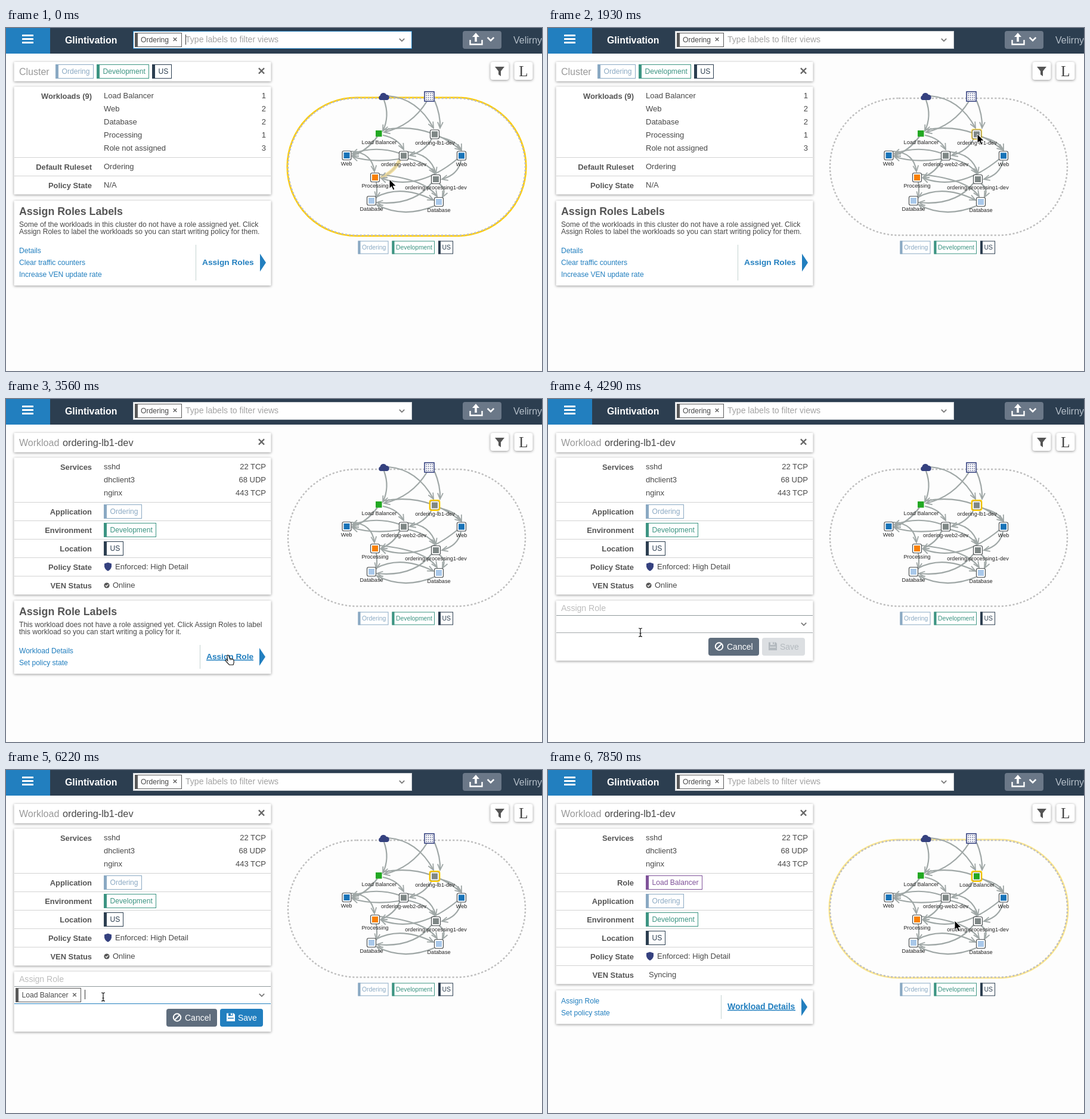
These frames come from a looping animation (899 by 576 pixels, 7.99 s). An HTML page:

```html
<!DOCTYPE html>
<html lang="en">
<head>
<meta charset="utf-8">
<title>Workload map</title>
<style>
  html, body { margin: 0; width: 100%; height: 100%; overflow: hidden; background: #fdfdfd; }
  svg { display: block; width: 100%; height: 100%; font-family: "Liberation Sans", Arial, sans-serif; }
  text { white-space: pre; }
  .panel { fill: #fff; filter: drop-shadow(0 1px 2px rgba(0,0,0,.42)); }
  .edge { fill: none; stroke: #9fa7a6; stroke-width: 2.2; }
</style>
</head>
<body>
<svg id="stage" viewBox="0 0 899 576" xmlns="http://www.w3.org/2000/svg"></svg>
<script>
const LOOP = 7990;
const BLUE = '#227fbf', NAVY = '#35417f', SLATE = '#2c3e50', SKY = '#8aa9c3', GREEN = '#3c9482', YELLOW = '#fc0';

// Drawing helpers
const text = (x, y, s, size = 13, fill = '#484848', extra = '') =>
  `<text x="${x}" y="${y}" font-size="${size}" fill="${fill}" ${extra}>${s}</text>`;
const bold = (x, y, s, size = 13, fill = '#555', extra = '') => text(x, y, s, size, fill, `font-weight="700" ${extra}`);
const right = (x, y, s) => text(x, y, s, 13, '#484848', 'text-anchor="end"');
const rect = (x, y, w, h, fill, extra = '') => `<rect x="${x}" y="${y}" width="${w}" height="${h}" fill="${fill}" ${extra}/>`;
const path = (d, stroke, width = 1, extra = 'fill="none"') => `<path d="${d}" stroke="${stroke}" stroke-width="${width}" ${extra}/>`;
const panel = (y, h) => rect(13.5, y, 431, h, '#fff', 'class="panel" rx="1"');
const rule = (y, color = '#d3d3d3') => path(`M14 ${y}H444`, color);
const group = (id, body) => `<g id="${id}">${body}</g>`;
const cross = (x, y, r, width, color = '#666') =>
  path(`M${x - r} ${y - r}l${2 * r} ${2 * r}m0 ${-2 * r}l${-2 * r} ${2 * r}`, color, width);
const chevron = (x, y, r, color, width) => path(`M${x - r} ${y - r / 2}l${r} ${r}l${r} ${-r}`, color, width);
const underline = (x, y, w) => path(`M${x} ${y}h${w}`, BLUE, 1.3);

function tag(x, y, w, label, color, { h = 24, stripe = 5, size = 12.1, ink = color, pad = 10.5 } = {}) {
  return rect(x + .5, y + .5, w - 1, h - 1, '#fff', `stroke="${color}"`) + rect(x, y, stripe, h, color) +
    text(x + pad, y + h / 2 + size * .36, label, size, ink);
}
const arrowTab = (x, y, h) => `<path d="M${x} ${y}v${h}l10 ${-h / 2}z" fill="${BLUE}"/>`;
const action = (lineX, y, label, x, size = 13.7) =>
  path(`M${lineX} ${y - 20}v40`, '#c5d3d1') + bold(x, y + 4, label, size, BLUE) + arrowTab(425, y - 15, 30);
const link = (y, s) => text(22, y, s, 12.05, BLUE);

// Header and tool buttons
const header = rect(0, 0, 899, 43, SLATE) + rect(0, 0, 74, 43, BLUE) +
  [11, 17, 23].map(y => rect(27, y, 19, 3, '#fff', 'rx=".6"')).join('') +
  bold(99, 25.5, 'Glintivation', 15.9, '#fff') +
  rect(213.5, 5.5, 467, 29, '#fff', 'id="search"') +
  tag(216, 8, 79, 'Ordering', '#5a5a5a', { ink: '#484848', pad: 10 }) + cross(283.5, 19, 2.8, 1.5) +
  text(301, 24, 'Type labels to filter views', 14.05, '#a3a3a3') +
  group('searchCaret', rect(301, 11, 1, 17, '#333')) + chevron(664, 20, 4.2, '#777', 1.8) +
  rect(766, 5, 65, 30, '#6b7888', 'rx="4"') +
  path('M778.5 20v7.5h20V20', '#fff', 2.4) + `<path d="M788 8l6 7h-4.2v8h-3.6v-8H782z" fill="#fff"/>` +
  chevron(813, 18.5, 5.3, '#fff', 2.7) + text(851, 25.5, 'Velirny', 16, '#b5bfc9');

const toolButton = x => rect(x, 57, 31, 30, '#fff', 'class="panel" rx="4"');
const tools = toolButton(812.5) + toolButton(852.5) +
  '<path d="M820 65h16l-6 7.5v8.5l-4-3v-5.5z" fill="#555"/>' +
  text(868, 81, 'L', 25, '#444', 'text-anchor="middle" style="font-family:\'Liberation Serif\',serif"');

// Left column: cluster view
const keyValues = (rows, y) => rows.map(([k, v], i) => text(164, y + 22 * i, k) + right(436, y + 22 * i, v)).join('');
const key = (y, s) => bold(144, y, s, 12.9, '#555', 'text-anchor="end"');
const close = cross(428.5, 72, 4.6, 2.2);

const cluster = panel(57, 32.5) + text(22, 79, 'Cluster', 16, '#999') +
  tag(83, 61, 64, 'Ordering', SKY) + tag(152, 61, 88, 'Development', GREEN) + tag(245, 61, 33, 'US', SLATE) + close +
  panel(98.5, 181) + key(118.5, 'Workloads (9)') +
  keyValues([['Load Balancer', 1], ['Web', 2], ['Database', 2], ['Processing', 1], ['Role not assigned', 3]], 118) +
  rule(217.5) + key(238, 'Default Ruleset') + text(164, 237, 'Ordering') +
  rule(248.5) + key(269, 'Policy State') + text(164, 268, 'N/A') +
  panel(290, 142.5) + bold(22, 314, 'Assign Roles Labels', 17.8) +
  text(22, 334, 'Some of the workloads in this cluster do not have a role assigned yet. Click', 12.1) +
  text(22, 346, 'Assign Roles to label the workloads so you can start writing policy for them.', 12.1) +
  link(378, 'Details') + link(398, 'Clear traffic counters') + link(418, 'Increase VEN update rate') +
  path('M318.5 364v60', '#c5d3d1') + bold(329, 398, 'Assign Roles', 13.7, BLUE) + arrowTab(426, 379, 30);

// Left column: workload view
const workloadHead = panel(57, 32.5) + text(22, 79, 'Workload', 16, '#999') + text(95, 79, 'ordering-lb1-dev', 16.3) + close;

function details(hasRole) {
  const tags = [['Application', 'Ordering', 64, SKY], ['Environment', 'Development', 88, GREEN], ['Location', 'US', 33, SLATE]];
  if (hasRole) tags.unshift(['Role', 'Load Balancer', 95, '#7f5299']);
  const end = 194 + 31 * tags.length;
  return panel(98.5, hasRole ? 261 : 230) + key(118.5, 'Services') +
    keyValues([['sshd', '22 TCP'], ['dhclient3', '68 UDP'], ['nginx', '443 TCP']], 118) +
    tags.map(([k, v, w, c], i) => rule(173.5 + 31 * i) + key(194 + 31 * i, k) + tag(164, 177 + 31 * i, w, v, c)).join('') +
    rule(end - 20.5) + key(end, 'Policy State') + text(183, end - 1, 'Enforced: High Detail') +
    `<path d="M165 ${end - 10.5}l6-2 6 2v5q-1 5-6 7.5q-5-2.5-6-7.5z" fill="${NAVY}"/>` +
    rule(end + 10.5) + key(end + 31, 'VEN Status') +
    (hasRole ? text(169, end + 30, 'Syncing')
      : `<circle cx="169" cy="${end + 26}" r="4.6" fill="#555"/>` + path(`M166.8 ${end + 26}l1.7 1.8 3-3.4`, '#fff', 1.3) + text(179, end + 30, 'Online'));
}

const unlabelled = panel(338.5, 123) + bold(22, 363, 'Assign Role Labels', 17.8) +
  text(22, 383, 'This workload does not have a role assigned yet. Click Assign Roles to label', 12.1) +
  text(22, 395, 'this workload so you can start writing a policy for it.', 12.1) +
  link(427, 'Workload Details') + link(447, 'Set policy state') + action(325.5, 433, 'Assign Role', 336) +
  group('linkHover', underline(22, 428.5, 91)) + group('assignHover', underline(336, 438.5, 79));

const labelled = panel(370, 56.5) + link(392, 'Assign Role') + link(412, 'Set policy state') +
  action(290.5, 398, 'Workload Details', 301, 14) + underline(301, 403.5, 114);

const saveButton = (fill, ink) => rect(359, 401, 72, 30, fill, 'rx="4"') +
  `<path d="M370 408.5h12l2 2v11.5h-14z" fill="${ink}"/>` + rect(373, 408.5, 7, 4.5, fill) + rect(377, 408.5, 2, 3.5, ink) +
  rect(372, 416, 10, 1.5, fill) + text(389, 421, 'Save', 14, ink);

const option = (y, s) => text(24, y, s);
const editor = panel(338.5, 101) + text(22, 356, 'Assign Role', 14.05, '#bdbdbd') +
  rule(363.5, '#8f989b') + rule(392.5, '#a2a8ab') + group('focusLine', rule(392.5, BLUE)) + chevron(429, 378, 4.2, '#777', 1.8) +
  rect(269, 401, 85, 30, '#5f6d7d', 'rx="4"') + '<circle cx="287" cy="415.5" r="6.2" fill="none" stroke="#fff" stroke-width="2"/>' +
  path('M283 419.5l8-8', '#fff', 2) + text(300, 421, 'Cancel', 14, '#fff') +
  saveButton('#dcdfe2', '#b4babf') + group('saveOn', saveButton(BLUE, '#fff')) +
  group('editCaret', rect(20, 369, 1, 16, '#333')) + group('typed', text(20, 383, 'lo')) +
  group('allOptions', panel(393, 128) + ['Database', 'Load Balancer', 'Processing', 'Web'].map((s, i) => option(414 + 30 * i, s)).join('')) +
  group('oneOption', panel(393, 32) + option(414, 'Load Balancer')) +
  group('picked', tag(16, 366, 110, 'Load Balancer', '#5a5a5a', { ink: '#484848' }) + cross(115, 377.5, 2.8, 1.5)) +
  group('pickedCaret', rect(132, 369, 1, 16, '#333'));

// Traffic map
const edges = [
  'M634 121Q644 148 632 173', 'M641 114Q690 118 717 168', 'M706 123Q680 165 634 175', 'M719 122Q729 146 728 168',
  'M633 171Q706 158 763 205', 'M632 180Q657 185 667 204', 'M623 182Q605 207 581 214', 'M659 210Q620 197 581 211',
  'M659 220Q615 227 581 216', 'M714 186Q703 207 677 214', 'M727 183Q757 190 764 205', 'M579 207Q614 209 618 241',
  'M660 222Q652 241 629 251', 'M674 208Q712 211 721 244', 'M674 219Q707 226 719 244', 'M763 223Q758 247 731 254',
  'M757 220Q690 275 629 252', 'M621 259Q623 274 621 285', 'M627 246Q704 254 723 283', 'M714 260Q684 299 622 293',
  'M727 262Q739 270 732 284', 'M621 284Q662 262 717 289', 'M718 299Q667 320 622 297'
];
const hoverEdge = edges[12];
const nodes = [
  [719, 178.5, '#7f8786'], [667, 214.5, '#7f8786'], [571.5, 214, '#1873b8'], [764, 214.5, '#1873b8'],
  [619, 251, '#f98006'], [721, 254, '#7f8786'], [613, 290, '#a9c8ea'], [726, 292, '#a9c8ea']
];
const labels = [
  [626, 194.5, 'Load Balancer'], [571, 231, 'Web'], [667, 232, 'ordering-web2-dev'], [764, 232, 'Web'],
  [619, 268, 'Processing'], [721, 271, 'ordering-processing1-dev'], [613, 307, 'Database'], [726, 309, 'Database']
];
const node = ([x, y, fill]) => rect(x - 7.5, y - 7.5, 15, 15, '#fff', 'rx="2.5" stroke="#4b4f52" stroke-width="1.2"') + rect(x - 5, y - 5, 10, 10, fill);
const nodeLabel = ([x, y, s]) => text(x, y, s, 9.15, '#222', 'text-anchor="middle"');
const hull = (outset, extra) =>
  rect(473 - outset, 118 - outset, 398 + 2 * outset, 230 + 2 * outset, 'none', `rx="${115 + outset}" ${extra}`);
const gridDots = Array.from({ length: 16 }, (_, i) => rect(704.4 + i % 4 * 3.3, 109.4 + (i >> 2) * 3.3, 1.4, 1.4, NAVY)).join('');
const small = { h: 22, stripe: 4, size: 10.35, pad: 6.5 };

const map = '<defs><marker id="tip" markerUnits="userSpaceOnUse" markerWidth="14" markerHeight="12" refX="11" refY="6" orient="auto">' +
  path('M1 1.5L11 6L1 10.5', '#9fa7a6', 1.8) + '</marker></defs>' +
  hull(1.2, `id="hullGlow" stroke="${YELLOW}" stroke-width="2.8"`) + hull(0, 'stroke="#bfbfbf" stroke-width="2.5" stroke-dasharray="3.2 3"') +
  group('edgeHover', path(hoverEdge, '#f7e5ab', 6)) +
  edges.map(d => `<path class="edge" d="${d}" marker-end="url(#tip)"/>`).join('') +
  group('edgeHoverTop', path(hoverEdge, '#e4d29a', 2.3)) +
  `<path d="M628 121a4 4 0 0 1-.5-7.5a5.6 5.6 0 0 1 10.5-1.5a4.6 4.6 0 0 1 1.500 9z" fill="${NAVY}"/>` +
  rect(702, 107, 16, 16, '#fff', `stroke="${NAVY}" stroke-width="1.6"`) + gridDots +
  rect(620, 172, 10.5, 10.5, '#22a822') + nodes.map(node).join('') +
  group('roleNode', rect(714, 173.5, 10, 10, '#22a822')) +
  rect(710.7, 170.2, 16.6, 16.6, 'none', `id="ring" rx="3" stroke="${YELLOW}" stroke-width="2.2"`) +
  labels.map(nodeLabel).join('') +
  group('plainName', nodeLabel([719.5, 196, 'ordering-lb1-dev'])) + group('roleName', nodeLabel([719.5, 196, 'Load Balancer'])) +
  tag(590.5, 357.5, 51, 'Ordering', SKY, small) + tag(647.5, 357.5, 71.5, 'Development', GREEN, small) + tag(725, 357.5, 25, 'US', SLATE, small);

const pointers = group('arrow', '<path d="M0 0v15.500l3.600-3.300 2.600 6 2.700-1.200-2.600-5.700h5z" fill="#000" stroke="#fff" stroke-width="1"/>') +
  group('hand', '<path d="M-1.300 1.200Q0-.8 1.500 1l2 5.300q1-1 2.200.3q1.300-.8 2.200.6q1.700-.4 2 1.500l.4 3.500-1.200 4.300h-6.600l-5-5.500q-2.200-2.300-.8-3q1.300-.4 3 1.500z" fill="#fff" stroke="#222" stroke-width="1.200"/>' +
    path('M3.500 6.300l.8 2.500M5.700 6.600l.6 2', '#222', .8)) +
  group('beam', path('M-3-7q2 0 3 1q1-1 3-1M0-6v12M-3 7q2 0 3-1q1 1 3 1M-1.500 2h3', '#111', 1.2));

document.getElementById('stage').innerHTML = rect(0, 0, 899, 576, '#fdfdfd') + map + header + tools +
  group('cluster', cluster) +
  group('workload', workloadHead + group('plainDetails', details(false)) + group('roleDetails', details(true)) +
    group('unlabelled', unlabelled) + group('editor', editor) + group('labelled', labelled)) +
  group('pointer', pointers);

// Intervals during which each part is on screen
const OPENED = 2230, EDIT = 3850, SAVED = 7400, ROLE = 7550;
const visible = {
  searchCaret: [[0, 150]], edgeHover: [[0, 300]], edgeHoverTop: [[0, 300]],
  cluster: [[0, OPENED]], workload: [[OPENED, LOOP]], plainDetails: [[OPENED, ROLE]], roleDetails: [[ROLE, LOOP]],
  unlabelled: [[OPENED, EDIT], [SAVED, ROLE]], editor: [[EDIT, SAVED]], labelled: [[ROLE, LOOP]],
  linkHover: [[2820, 3110]], assignHover: [[3560, EDIT], [SAVED, ROLE]],
  focusLine: [[4730, 6960]], editCaret: [[4730, 5180]], allOptions: [[5630, 5780]],
  typed: [[5780, 6220]], oneOption: [[5780, 6220]], picked: [[6220, SAVED]], pickedCaret: [[6220, 6960]], saveOn: [[6220, SAVED]],
  plainName: [[0, ROLE]], roleName: [[ROLE, LOOP]], roleNode: [[ROLE, LOOP]]
};
const moves = [
  [0, 643, 254, 'arrow'], [150, 645, 253, 'arrow'], [300, 657, 246, 'arrow'], [450, 672, 236, 'arrow'], [590, 686, 225, 'arrow'],
  [740, 698, 214, 'arrow'], [890, 708, 203, 'arrow'], [1040, 714, 194, 'arrow'], [1190, 718, 186, 'arrow'], [1340, 720, 178, 'arrow'],
  [2230, 610, 208, 'arrow'], [2370, 320, 291, 'arrow'], [2670, 122, 409, 'arrow'], [2820, 100, 415, 'hand'],
  [3110, 160, 432, 'arrow'], [3260, 260, 445, 'arrow'], [3410, 330, 443, 'arrow'], [3560, 372, 430, 'hand'],
  [3850, 372, 430, 'arrow'], [4000, 325, 422, 'arrow'], [4140, 225, 402, 'arrow'], [4290, 155, 392, 'beam'], [4440, 161, 384, 'beam'],
  [4580, 163, 381, 'beam'], [6520, 200, 388, 'beam'], [6670, 292, 402, 'arrow'], [6810, 355, 412, 'arrow'], [6960, 371, 414, 'hand'],
  [7550, 371, 403, 'hand'], [7700, 500, 335, 'arrow'], [7850, 682, 253, 'arrow']
];
const glow = [[0, 1], [1340, .75], [1490, .5], [1640, .25], [1780, 0], [7850, .45]];
const ring = [[0, 0], [1340, .3], [1930, .5], [2080, 1]];

const el = id => document.getElementById(id);
const stepAt = (table, t) => table.findLast(row => row[0] <= t);

function draw(t) {
  for (const id in visible) el(id).style.display = visible[id].some(([a, b]) => t >= a && t < b) ? '' : 'none';
  const [, x, y, kind] = stepAt(moves, t);
  el('pointer').setAttribute('transform', `translate(${x} ${y})`);
  for (const id of ['arrow', 'hand', 'beam']) el(id).style.display = id === kind ? '' : 'none';
  el('hullGlow').style.opacity = stepAt(glow, t)[1];
  el('ring').style.opacity = stepAt(ring, t)[1];
  el('search').setAttribute('stroke', t < 150 ? BLUE : '#c9ced3');
}

const start = performance.now();
function tick() {
  draw((performance.now() - start) % LOOP);
  requestAnimationFrame(tick);
}
tick();
</script>
</body>
</html>
```
